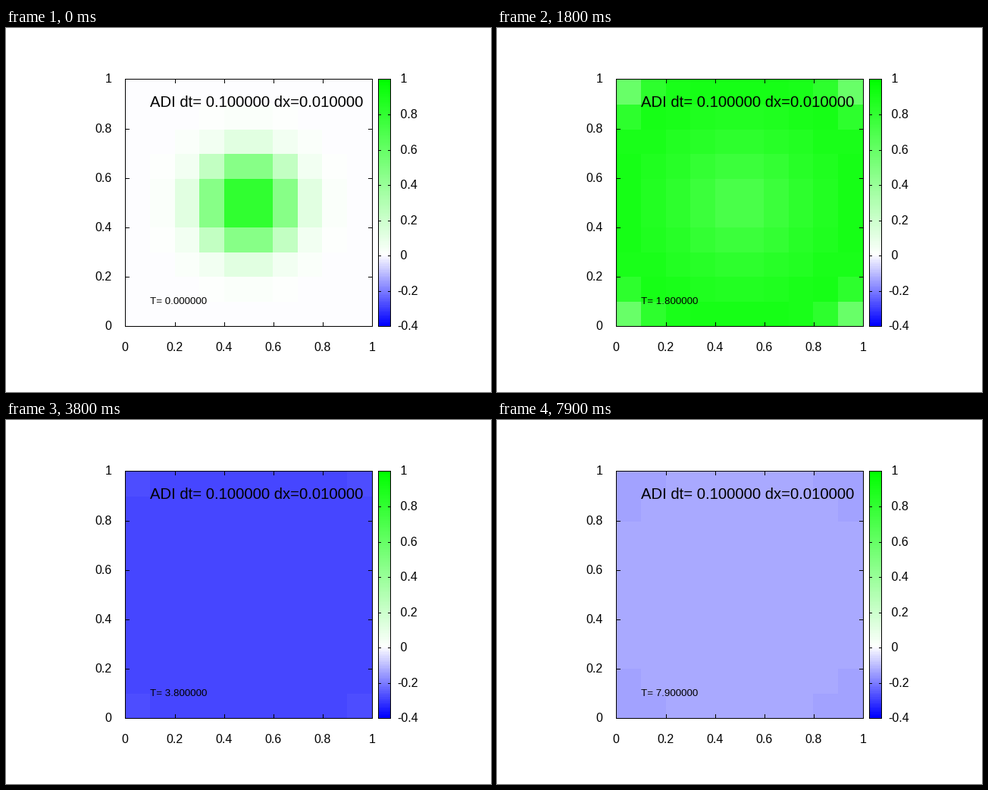
Write a matplotlib script that moves like this. It is 640x480 px and loops after 8000 ms.

```python
import math

import numpy as np
import matplotlib.pyplot as plt
from matplotlib.animation import FuncAnimation
from matplotlib.colors import LinearSegmentedColormap

W, H, DPI = 640, 480, 100
FRAMES, STEP_MS = 80, 100
LEFT, RIGHT, TOP, BOTTOM = 157, 483, 67, 393
SIZE = RIGHT - LEFT
BAR_L, BAR_R = 491, 507
LOW, HIGH = -0.4, 1.0

plt.rcParams["font.family"] = "Liberation Sans"
fig = plt.figure(figsize=(W / DPI, H / DPI), dpi=DPI, facecolor="white")
ax = fig.add_axes([0, 0, 1, 1])
ax.axis("off")

zero = -LOW / (HIGH - LOW)
cmap = LinearSegmentedColormap.from_list(
    "heat", [(0, "#0000ff"), (zero, "#ffffff"), (1, "#00ff00")], N=128)

# Distance of each cell from the middle of the square
mid = np.arange(10) * 0.1 - 0.45
r = np.hypot(*np.meshgrid(mid, mid))


def sigmoid(z):
    return 1 / (1 + np.exp(-z))


def field(t):
    """Excitation pulse: front spreads, plateau sags, back follows, slow recovery."""
    front = 0.158 + 0.173 * t + 0.059 * t**2
    steep = 16 + 1.9 * np.exp(-5 * t) + 4 * min(t - 0.8, 1.2) ** 2
    rise = sigmoid(steep * (front - r))

    plateau = np.minimum(0.95, 0.7 + 0.48 * r - 0.17 * (t - 1.8))
    s = t - 3
    back = 0.39 + 0.58 * s + 0.1 * s**2
    hold = sigmoid(16 * (r - back))

    lag = 0.1 * np.clip((r - 0.52) / 0.05, 0, 1)
    q = t - 3.8 - lag
    rest = -np.exp(-1.255 - 0.143 * q - 0.009 * q**2)
    return rise * (rest + (plateau - rest) * hold)


def line(x0, y0, x1, y1):
    """One-pixel black line through pixel centres."""
    ax.plot([x0 + 0.5, x1 + 0.5], [y0 + 0.5, y1 + 0.5], color="black",
            lw=72 / DPI, solid_capstyle="projecting", snap=False, zorder=3)


def box(x0, x1):
    for x in (x0, x1):
        line(x, TOP, x, BOTTOM)
    for y in (TOP, BOTTOM):
        line(x0, y, x1, y)


def label(x, y, s, px=16, ha="left"):
    return ax.text(x, y, s, fontsize=px * 72 / DPI, ha=ha, va="baseline",
                   color="black", zorder=4)


edges = np.trunc(SIZE / 10 * np.arange(-5, 6))
mesh = ax.pcolormesh((LEFT + RIGHT) / 2 + edges, (TOP + BOTTOM) / 2 + 1 + edges,
                     field(0), cmap=cmap, vmin=LOW, vmax=HIGH,
                     antialiased=False, edgecolors="none")
ax.imshow(np.linspace(HIGH, LOW, 128)[:, None], cmap=cmap, vmin=LOW, vmax=HIGH,
          extent=(BAR_L, BAR_R + 1, BOTTOM, TOP), aspect="auto",
          interpolation="nearest")

box(LEFT, RIGHT)
box(BAR_L, BAR_R)

for i in range(6):
    x = math.ceil(LEFT + SIZE * i / 5)
    y = math.ceil(BOTTOM - SIZE * i / 5)
    name = f"{i / 5:g}"
    label(x - 0.3, 426, name, ha="center")
    label(139.5, y + 5, name, ha="right")
    line(x, TOP, x, TOP + 5)
    line(x, BOTTOM - 5, x, BOTTOM)
    line(LEFT, y, LEFT + 5, y)
    line(RIGHT - 5, y, RIGHT, y)

for i in range(8):
    y = math.ceil(BOTTOM - SIZE * i / 7)
    label(516.5, y + 5, f"{(i - 2) / 5: g}")
    line(BAR_L, y, BAR_L + 3, y)
    line(BAR_R - 3, y, BAR_R, y)

label(190, 104, "ADI dt= 0.100000 dx=0.010000", px=20.3)
clock = label(190, 364, "", px=13.33)

ax.set_xlim(0, W)
ax.set_ylim(H, 0)


def update(n):
    t = n * STEP_MS / 1000
    mesh.set_array(field(t))
    clock.set_text(f"T= {t:.6f}")
    return mesh, clock


anim = FuncAnimation(fig, update, frames=FRAMES, interval=STEP_MS,
                     repeat=True, repeat_delay=0)
plt.show()
```
